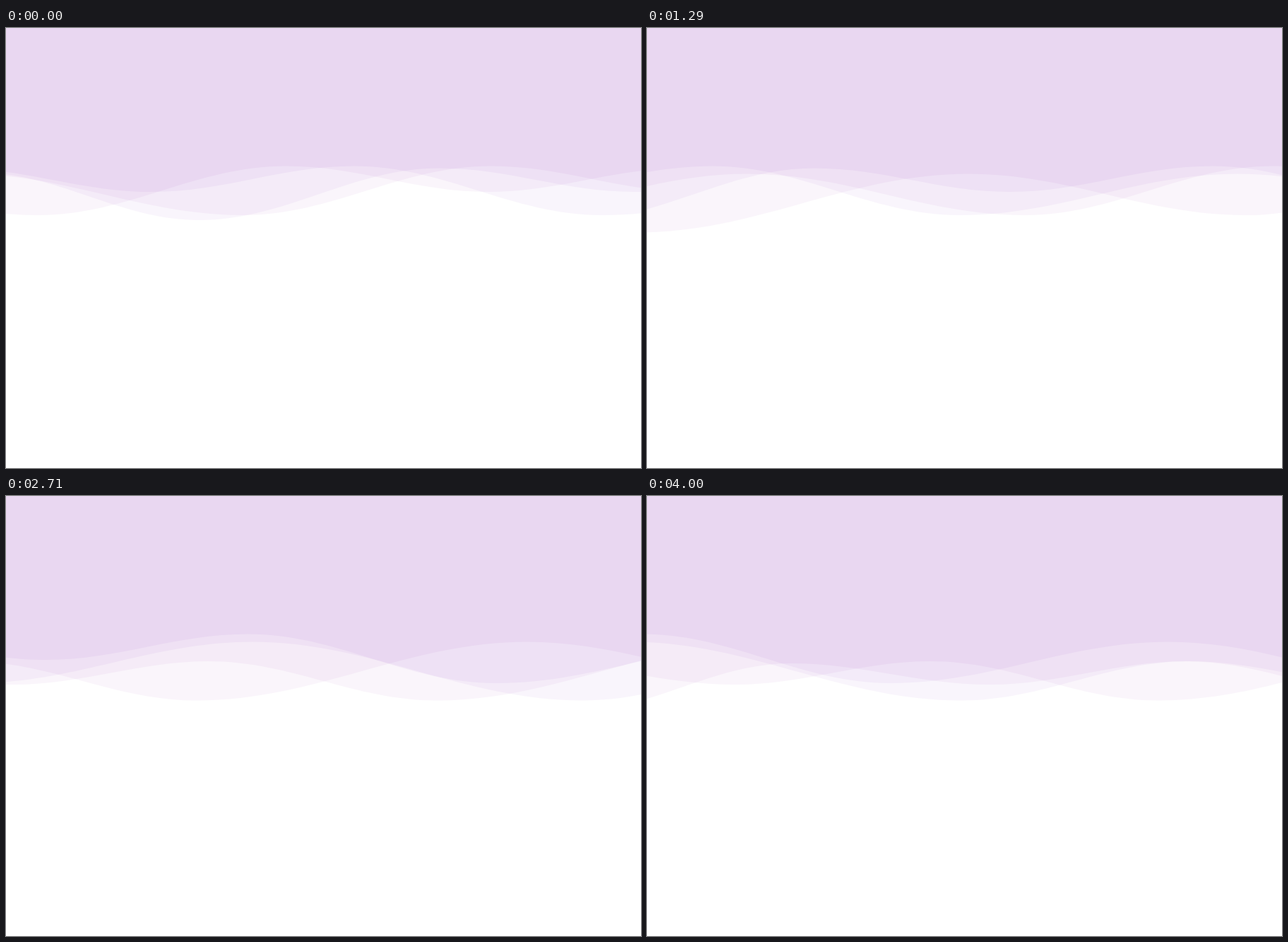
Write an HTML page with a canvas that moves like this. It is 899 px wide and 623 px high and loops after 4080 ms.

```html
<!DOCTYPE html>
<html lang="en">
<head>
<meta charset="utf-8">
<title>Layered waves</title>
<style>
  html, body { margin: 0; width: 100%; height: 100%; overflow: hidden; background: #fff; }
  canvas { display: block; }
</style>
</head>
<body>
<canvas id="stage" width="899" height="623"></canvas>
<script>
const ctx = document.getElementById('stage').getContext('2d');
const LOOP = 4080, RATE = 14;

// Crests and troughs of the line all waves share: x, y
const line = [
  [-650, 205], [-340, 272], [0, 198.5], [277, 232], [564, 195.5], [915, 265],
  [1308, 206.5], [1776, 289.5], [2099, 234], [2376, 267], [2658, 237], [2968, 305]
];

// Steady drift that slows down at the end: step, distance
const drift = [[0, 0], [15, 445], [23, 650], [43, 1261], [47, 1345], [51, 1399]];

// dir 1 drifts left; dir -1 is mirrored and drifts right
const waves = [
  { dir: 1, start: 613, speed: 0.846 },
  { dir: 1, start: -71, speed: 0.901 },
  { dir: -1, start: 960, speed: 1.101 },
  { dir: -1, start: 1250, speed: 1.152 }
];

// The motion rests for two ticks at first, then for one tick in twenty
function stepAt(ms) {
  const tick = Math.floor((ms + 5) * RATE / 1000);
  return Math.max(0, tick - 2 - Math.floor((tick + 9) / 20));
}

function distance(step) {
  const i = Math.max(1, drift.findIndex(([s]) => s >= step));
  const [s0, d0] = drift[i - 1], [s1, d1] = drift[i];
  return d0 + (d1 - d0) * (step - s0) / (s1 - s0);
}

function drawWave(dir, offset) {
  const pts = line.map(([x, y]) => [offset + dir * x, y]);
  ctx.fillStyle = dir > 0 ? 'rgb(6, 10, 3)' : 'rgb(5, 10, 4)';
  ctx.beginPath();
  ctx.moveTo(pts[0][0], 0);
  ctx.lineTo(...pts[0]);
  for (let i = 1; i < pts.length; i++) {
    const [x0, y0] = pts[i - 1], [x1, y1] = pts[i];
    const handle = (x1 - x0) * 0.364;
    ctx.bezierCurveTo(x0 + handle, y0, x1 - handle, y1, x1, y1);
  }
  ctx.lineTo(pts[pts.length - 1][0], 0);
  ctx.fill();
}

function draw(ms) {
  const moved = distance(stepAt(ms));
  ctx.globalCompositeOperation = 'source-over';
  ctx.fillStyle = '#fff';
  ctx.fillRect(0, 0, 899, 623);
  // Each wave takes a little light away from the white
  ctx.globalCompositeOperation = 'difference';
  for (const { dir, start, speed } of waves) drawWave(dir, start - dir * speed * moved);
}

let begin;
function frame(now) {
  begin ??= now;
  draw((now - begin) % LOOP);
  requestAnimationFrame(frame);
}
requestAnimationFrame(frame);
</script>
</body>
</html>
```
